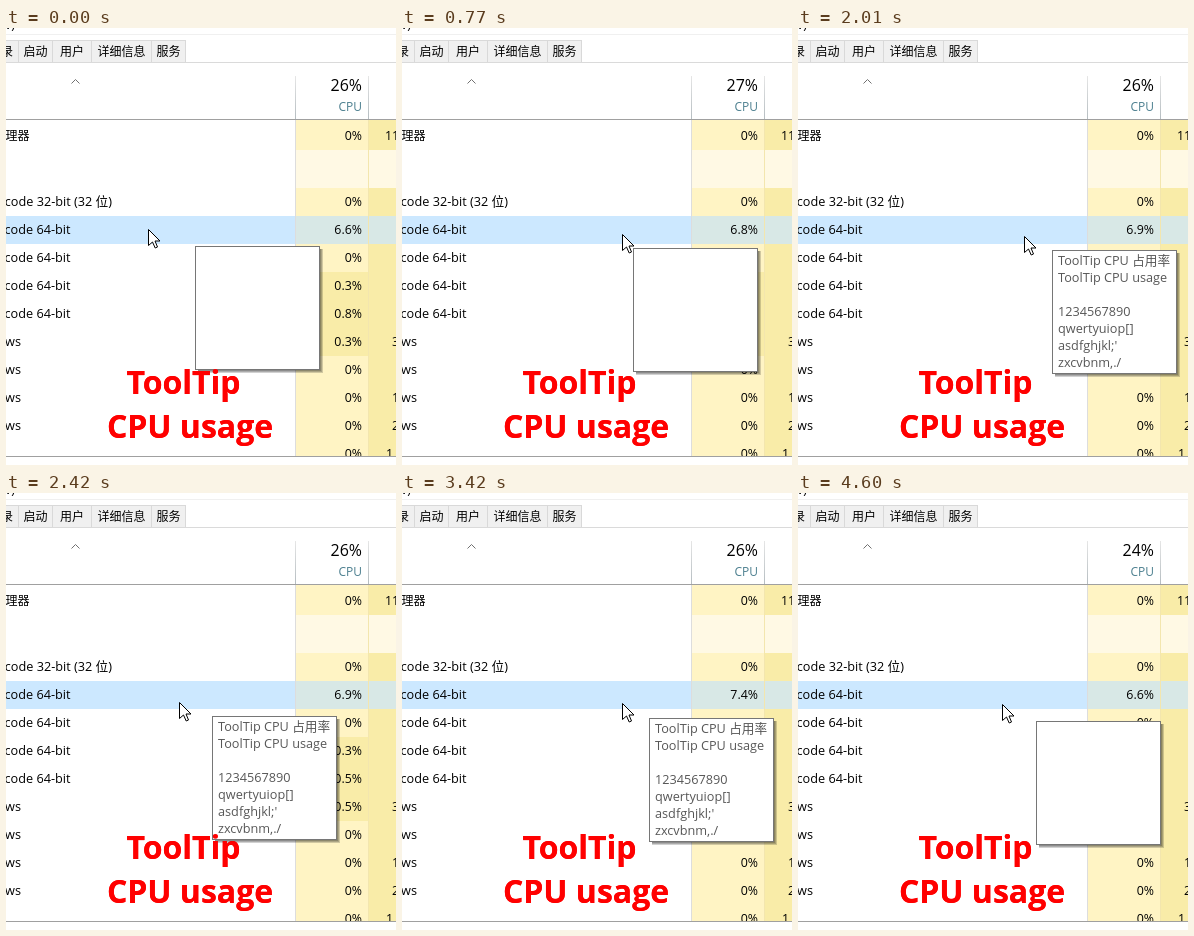
Write an HTML page with a canvas that moves like this. It is 390 px wide and 437 px high and loops after 4670 ms.

```html
<!DOCTYPE html>
<html lang="zh-CN">
<head>
<meta charset="utf-8">
<title>ToolTip CPU usage</title>
<style>
html, body { margin: 0; width: 100%; height: 100%; overflow: hidden; background: #fff; }
canvas { display: block; }
</style>
</head>
<body>
<canvas id="stage" width="390" height="437"></canvas>
<script>
const ctx = document.getElementById('stage').getContext('2d');
const LOOP = 4670, STEP = 77.9, LEAD = 17, LAST = 59;
const FAMILY = '"Open Sans", "Noto Sans CJK SC", "Noto Sans CJK", sans-serif';
const PALE = '#fff4c4', FAINT = '#fff9e4', WARM = '#f9eca8', SELECTED = '#cce8ff', MIXED = '#d8e8e6';
const ROW = 28, FIRST_ROW = 160;

// Turning points of the pointer: step, x, distance to the tooltip.
const turns = [
  [0, 142, 47], [4, 262, 20], [8, 150, 40], [11, 243, 1], [14, 147, 44], [17, 250, 16],
  [19, 154, 46], [26, 226, 28], [30, 156, 36], [33, 225, 24], [35, 156, 32], [37, 267, -3],
  [42, 171, 40], [46, 268, 14], [53, 189, 62], [56, 262, 14], [60, 194, 37]
];

const totals = [26, 27, 26, 26, 24];
const mainLoads = [6.6, 6.8, 6.9, 7.4, 6.6];

const tipLines = ['ToolTip CPU 占用率', 'ToolTip CPU usage', '', '1234567890',
  'qwertyuiop[]', "asdfghjkl;'", 'zxcvbnm,./'];

function rect(x, y, w, h, color) {
  ctx.fillStyle = color;
  ctx.fillRect(x, y, w, h);
}

function text(str, x, y, { size = 12.4, color = '#000', align = 'left', weight = 400 } = {}) {
  ctx.font = `${weight} ${size}px ${FAMILY}`;
  ctx.textAlign = align;
  ctx.fillStyle = color;
  ctx.fillText(str, x, y);
}

function poseAt(step) {
  const next = turns.findIndex(turn => turn[0] > step);
  const [from, x0, gap0] = turns[next - 1];
  const [to, x1, gap1] = turns[next];
  const ease = (1 - Math.cos(Math.PI * (step - from) / (to - from))) / 2;
  const x = Math.round(x0 + (x1 - x0) * ease);
  const drift = step / LAST;
  return {
    x,
    y: Math.round(201 + 10 * drift ** 0.4),
    tipX: x + Math.round(gap0 + (gap1 - gap0) * ease),
    tipY: Math.round(218 + 10 * drift)
  };
}

function drawTabs() {
  text('v)', -1, 1);
  rect(0, 6, 390, 1, '#f0f0f0');
  rect(0, 12, 180, 23, '#d9d9d9');
  const edges = [-20, 12, 46, 85, 145, 179];
  ['录', '启动', '用户', '详细信息', '服务'].forEach((label, i) => {
    const left = edges[i], right = edges[i + 1];
    rect(left + 1, 13, right - left - 1, 21, '#f0f0f0');
    if (i) text(label, (left + right) / 2 + 0.5, 28, { size: 12, align: 'center' });
    else text(label, 7, 28, { size: 12, align: 'right' });
  });
  rect(0, 34, 390, 1, '#dadada');
}

function drawHeader(total) {
  ctx.strokeStyle = '#707070';
  ctx.lineWidth = 1;
  ctx.beginPath();
  ctx.moveTo(65.5, 55.5);
  ctx.lineTo(69.5, 51.5);
  ctx.lineTo(73.5, 55.5);
  ctx.stroke();
  const fade = ctx.createLinearGradient(0, 48, 0, 92);
  fade.addColorStop(0, '#e6e6e6');
  fade.addColorStop(1, '#b4bcc0');
  rect(289, 48, 1, 44, fade);
  rect(362, 48, 1, 44, fade);
  text(total + '%', 356, 63, { size: 16, align: 'right' });
  text('CPU', 356, 83, { size: 12, color: '#4c7f8f', align: 'right' });
}

function drawTable(update) {
  rect(290, 92, 72, 30, PALE);
  rect(363, 92, 27, 30, WARM);
  rect(290, 122, 100, 38, FAINT);
  text('理器', 23.5, 112, { size: 12, align: 'right' });
  text('0%', 356, 112, { align: 'right' });
  text('11', 379, 112);

  const code = { name: 'code 64-bit', end: 64.5 };
  const other = { name: 'ws', end: 15 };
  const rows = [
    { name: 'code 32-bit (32 位)', end: 106 },
    { ...code, load: mainLoads[update], selected: true },
    code,
    { ...code, load: 0.3 },
    { ...code, load: update ? 0.5 : 0.8 },
    { ...other, load: update ? 0.5 : 0.3, side: '3' },
    other,
    { ...other, side: '1' },
    { ...other, side: '2' },
    { name: '', end: 0, side: '1.' }
  ];

  ctx.save();
  ctx.beginPath();
  ctx.rect(0, 92, 390, 336);
  ctx.clip();
  rows.forEach(({ name, end, load = 0, side = '', selected }, i) => {
    const top = FIRST_ROW + i * ROW, base = top + 18;
    if (selected) rect(0, top, 390, ROW, SELECTED);
    rect(290, top, 72, ROW, selected ? MIXED : load ? WARM : PALE);
    rect(363, top, 27, ROW, selected ? MIXED : WARM);
    text(name, end, base, { size: 12.7, align: 'right' });
    text(load + '%', 356, base, { align: 'right' });
    text(side, side.length > 1 ? 380 : 386, base);
  });
  ctx.restore();

  rect(289, 92, 1, 336, '#dddddd');
  rect(362, 92, 1, 336, '#f3e6ae');
  rect(0, 91, 390, 1, '#a0a0a0');
  rect(0, 428, 390, 1, '#a0a0a0');
}

function drawCaption() {
  const style = { size: 32, weight: 700, color: '#f00', align: 'center' };
  text('ToolTip', 177.5, 366, style);
  text('CPU usage', 184, 410, style);
}

function drawTip(x, y, count) {
  for (let i = 3; i > 0; i--) rect(x + 3, y + 3, 122 + i, 121 + i, 'rgba(0,0,0,0.18)');
  rect(x, y, 125, 124, '#767676');
  rect(x + 1, y + 1, 123, 122, '#fff');
  tipLines.slice(0, count).forEach((line, i) =>
    text(line, x + 6, y + 15 + i * 17, { size: 12.7, color: '#575757' }));
}

function drawPointer(x, y) {
  const outline = [[0, 0], [0, 16], [4, 12.5], [6.7, 18.5], [9, 17.5], [6.5, 11.5], [11.5, 11.5]];
  ctx.beginPath();
  outline.forEach(([dx, dy]) => ctx.lineTo(x + 0.5 + dx, y + 0.5 + dy));
  ctx.closePath();
  ctx.fillStyle = '#fff';
  ctx.fill();
  ctx.strokeStyle = '#000';
  ctx.lineWidth = 1;
  ctx.stroke();
}

// Each repaint of the tooltip: blank, then the first lines, then all of them.
function visibleLines(step) {
  const phase = (step + 2) % 12;
  if (phase < 3) return 0;
  return phase === 3 ? 2 : tipLines.length;
}

function draw(time) {
  const step = Math.min(LAST, Math.floor((time % LOOP + LEAD) / STEP));
  const update = Math.floor((step + 5) / 13.5);
  const pose = poseAt(step);
  rect(0, 0, 390, 437, '#fff');
  drawTabs();
  drawHeader(totals[update]);
  drawTable(update);
  drawCaption();
  drawTip(pose.tipX, pose.tipY, visibleLines(step));
  // The caption lies over the tooltip.
  drawCaption();
  drawPointer(pose.x, pose.y);
}

const begin = performance.now();
function tick() {
  draw(performance.now() - begin);
  requestAnimationFrame(tick);
}
tick();
</script>
</body>
</html>
```
